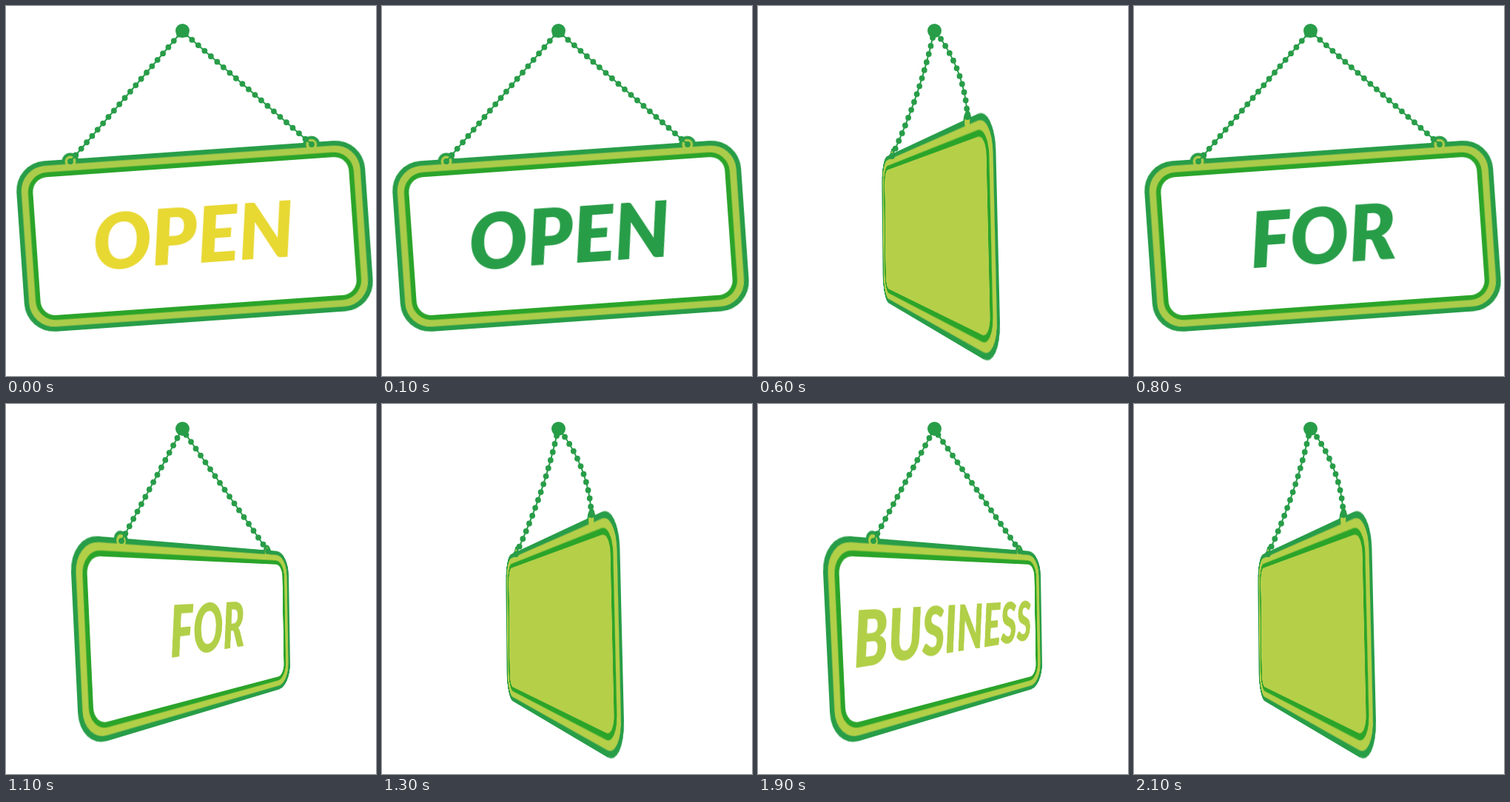
An HTML page for the animation above (2.2 s loop, 500 by 500 pixels).

```html
<!DOCTYPE html>
<html lang="en">
<head>
<meta charset="utf-8">
<title>Open for business</title>
<style>
  html, body { margin: 0; width: 100%; height: 100%; overflow: hidden; background: #fff; }
  #stage { position: relative; width: 500px; height: 500px; overflow: hidden; }
  svg { position: absolute; left: 0; top: 0; overflow: visible; }
  #board { transform-origin: 0 0; --light: #abcc4a; --panel: #fff; }
  .dark { fill: #289d48; }
  .light { fill: var(--light); }
  .inner { fill: #2ba42a; }
  .panel { fill: var(--panel); }
  #word { font: italic 900 104px Lato, sans-serif; text-anchor: middle; }
  .cord { fill: none; stroke: #289d48; stroke-width: 2; }
  .beads { fill: none; stroke: #289d48; stroke-width: 7.8; stroke-linecap: round; stroke-dasharray: 0 11.3; }
</style>
</head>
<body>
<div id="stage">
  <svg id="board" width="472" height="231" viewBox="0 0 472 231">
    <circle class="dark" cx="75.5" cy="3" r="11.5"/>
    <circle class="dark" cx="402" cy="3" r="11.5"/>
    <rect class="dark" width="472" height="231" rx="40"/>
    <circle class="light" cx="75.5" cy="3" r="7.5"/>
    <circle class="light" cx="402" cy="3" r="7.5"/>
    <rect class="light" x="6.5" y="6.5" width="459" height="218" rx="34"/>
    <rect class="inner" x="15.5" y="15.5" width="441" height="200" rx="27"/>
    <rect class="panel" x="22" y="22" width="428" height="187" rx="20"/>
    <text id="word"></text>
  </svg>
  <svg width="500" height="500" viewBox="0 0 500 500">
    <path class="cord"/><path class="beads"/>
    <circle class="dark" cx="238.5" cy="33.5" r="9.5"/>
  </svg>
</div>
<script>
const W = 472, H = 231, LOOP = 2200;
const GREEN = '#289d48', YELLOW = '#e8d832', LIME = '#b2cf48';

// Corners run clockwise from the top left.
const poses = {
  front: {
    quad: [[11.5, 212.2], [482.4, 179.3], [498.5, 409.8], [27.6, 442.7]],
    ropes: 'M87 210L238 34M413 187L238 34', light: '#abcc4a', panel: '#fff'
  },
  turned: {
    quad: [[85.5, 175.5], [381.5, 200], [384.5, 381], [99.5, 466.5]],
    ropes: 'M156 185L238 34M354 199L238 34', light: LIME, panel: '#fff'
  },
  narrow: {
    quad: [[205, 158], [275, 200], [277, 390], [212, 478]],
    ropes: 'M225 172Q235 105 238 34M267 197Q262 110 238 34', light: LIME, panel: '#fff'
  },
  back: {
    quad: [[167, 206.5], [320, 135], [328.5, 491.5], [169, 397]],
    ropes: 'M181 203Q220 119 238 34M283 150Q280 88 241 36', light: '#b5cf49', panel: '#b5cf49'
  }
};

// Font size and horizontal shift, facing front and turned away.
const words = {
  OPEN: { front: [104, -2], turned: [91, -2] },
  FOR: { front: [104, 0], turned: [92, 7] },
  BUSINESS: { front: [89.5, 0], turned: [89.5, 1] }
};

const timeline = [];
function show(word, start, turn) {
  timeline.push(
    [start, 'front', word, YELLOW],
    [start + 100, 'front', word, GREEN],
    [turn, 'turned', word, LIME],
    [turn + 100, 'narrow', word, LIME],
    [turn + 200, 'back', '', LIME]
  );
}
show('OPEN', 0, 400);
show('FOR', 700, 1100);
show('BUSINESS', 1400, 1900);

// Perspective matrix taking the flat board to a quadrilateral.
function project([[x0, y0], [x1, y1], [x2, y2], [x3, y3]]) {
  const dx1 = x1 - x2, dx2 = x3 - x2, sx = x0 - x1 + x2 - x3;
  const dy1 = y1 - y2, dy2 = y3 - y2, sy = y0 - y1 + y2 - y3;
  const det = dx1 * dy2 - dx2 * dy1;
  const g = (sx * dy2 - sy * dx2) / det;
  const h = (dx1 * sy - dy1 * sx) / det;
  const m = [
    (x1 - x0 + g * x1) / W, (y1 - y0 + g * y1) / W, 0, g / W,
    (x3 - x0 + h * x3) / H, (y3 - y0 + h * y3) / H, 0, h / H,
    0, 0, 1, 0,
    x0, y0, 0, 1
  ];
  return `matrix3d(${m.map(v => v.toFixed(9)).join()})`;
}

const board = document.getElementById('board');
const label = document.getElementById('word');
const ropes = document.querySelectorAll('path');
let current;

function draw([, poseName, word, colour]) {
  const pose = poses[poseName];
  board.style.transform = project(pose.quad);
  board.style.setProperty('--light', pose.light);
  board.style.setProperty('--panel', pose.panel);
  ropes.forEach(rope => rope.setAttribute('d', pose.ropes));
  label.textContent = word;
  if (!word) return;
  const [size, shift] = words[word][poseName === 'front' ? 'front' : 'turned'];
  label.style.fontSize = size + 'px';
  label.setAttribute('x', W / 2 + shift);
  label.setAttribute('y', H / 2 + size * 0.35);
  label.setAttribute('fill', colour);
}

const origin = performance.now();
function tick() {
  const time = (performance.now() - origin) % LOOP;
  const step = timeline.findLast(([start]) => start <= time);
  if (step !== current) draw(current = step);
  requestAnimationFrame(tick);
}
tick();
</script>
</body>
</html>
```
